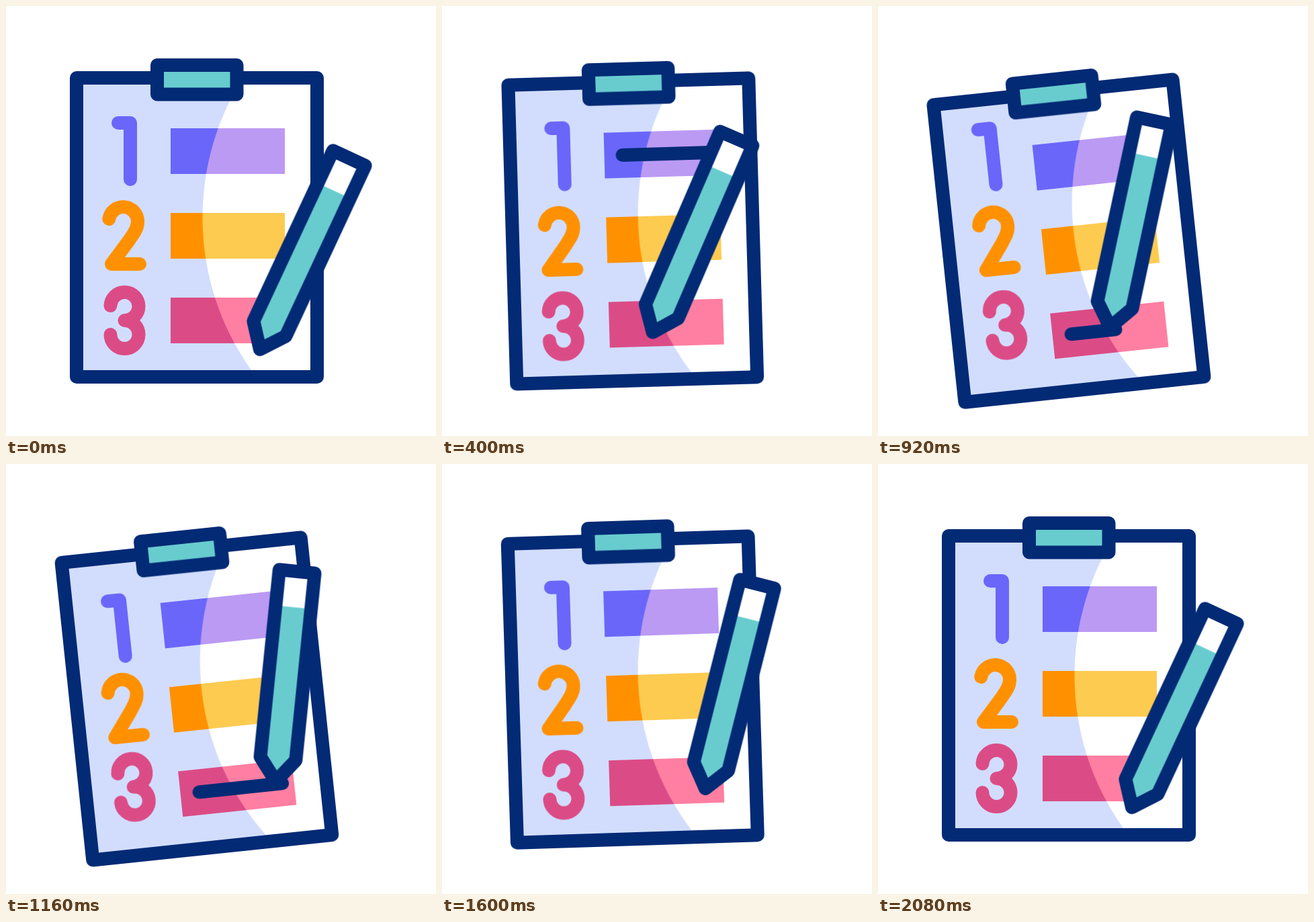
An HTML page that plays this animation: 640x640 px, repeating every 2600 ms.

```html
<!DOCTYPE html>
<html lang="en">
<head>
<meta charset="utf-8">
<title>Numbered list</title>
<style>
  html, body { margin: 0; width: 100%; height: 100%; overflow: hidden; background: #fff; }
  svg { display: block; width: 100vw; height: 100vh; }

  .outline { stroke: #032a75; stroke-width: 20; stroke-linejoin: round; stroke-linecap: round; }
  .digit { fill: none; stroke-width: 20; stroke-linejoin: round; stroke-linecap: round; }
  .line { fill: none; stroke-dasharray: 128 400; stroke-dashoffset: 142; }

  .board, .pencil, .digit, .line {
    animation: 2600ms cubic-bezier(.37, 0, .63, 1) infinite;
  }
  .board { transform-origin: 474px 340px; animation-name: tilt; }
  .pencil { animation-name: write; }
  .digit { animation-name: hop; }
  .two { animation-delay: 80ms; }
  .three { animation-delay: 160ms; }
  .line { animation-name: scribble; }
  .second { animation-delay: 305ms; }
  .third { animation-name: draw; }

  @keyframes tilt {
    0%, 4.615% { transform: rotate(0deg); }
    35.385%, 43.077% { transform: rotate(-6.05deg); }
    72.5%, 100% { transform: rotate(0deg); }
  }
  /* The pencil's origin is its tip. */
  @keyframes write {
    0%, 4.615% { transform: translate(378px, 511px) rotate(25deg); }
    23.077% { transform: translate(270px, 463.5px) rotate(25deg); }
    47.692%, 53.846% { transform: translate(392.5px, 464px) rotate(11.3deg); }
    73.077%, 100% { transform: translate(378px, 511px) rotate(25deg); }
  }
  @keyframes hop {
    0%, 13.846% { transform: translateY(0); }
    27.692%, 33.846% { transform: translateY(-24px); }
    47.692%, 100% { transform: translateY(0); }
  }
  @keyframes scribble {
    0%, 6.5% { stroke-dashoffset: 142; }
    6.9% { stroke-dashoffset: 128; }
    16.154% { stroke-dashoffset: 0; }
    22.3%, 100% { stroke-dashoffset: 142; }
  }
  @keyframes draw {
    0%, 22.5% { stroke-dashoffset: 142; }
    23% { stroke-dashoffset: 128; }
    47.3% { stroke-dashoffset: 0; }
    53.846%, 100% { stroke-dashoffset: 142; }
  }
</style>
</head>
<body>
<svg viewBox="0 0 640 640">
  <defs>
    <path id="shade" d="M105 107H352.3A391.5 391.5 0 0 0 372.4 552H105Z"/>
    <clipPath id="shaded"><use href="#shade"/></clipPath>
  </defs>

  <g class="board">
    <rect x="105" y="107" width="358" height="445" fill="#fff"/>
    <use href="#shade" fill="#d2ddfd"/>

    <path d="M245 182h170v68h-170z" fill="#bb9af3"/>
    <path d="M245 308h170v68h-170z" fill="#fdcb50"/>
    <path d="M245 434h170v68h-170z" fill="#fe7fa1"/>
    <g clip-path="url(#shaded)">
      <path d="M245 182h170v68h-170z" fill="#6a66fa"/>
      <path d="M245 308h170v68h-170z" fill="#ff9100"/>
      <path d="M245 434h170v68h-170z" fill="#db4c86"/>
    </g>

    <rect class="outline" x="105" y="107" width="358" height="445" fill="none"/>
    <rect class="outline" x="225" y="88" width="118.500" height="43.500" fill="#68cccf"/>

    <path class="digit" stroke="#6a66fa" d="M167 174H185V258"/>
    <path class="digit two" stroke="#ff9100"
      d="M153.300 317A21.500 21.500 0 0 1 196 321C196 333 188 341 183 349L157 384H199"/>
    <path class="digit three" stroke="#db4c86"
      d="M155.500 446A21 21 0 1 1 176.500 468A21 21 0 1 1 155.500 489"/>

    <path class="outline line" d="M272 216h128"/>
    <path class="outline line second" d="M272 342h128"/>
    <path class="outline line third" d="M273 468h128"/>

    <g class="pencil">
      <path d="M-26.500-314h53V-34L0 0L-26.500-34Z" fill="#68cccf"/>
      <path d="M-26.500-314h53v53.500h-53z" fill="#fff"/>
      <path class="outline" d="M-26.500-314h53V-34L0 0L-26.500-34Z" fill="none"/>
    </g>
  </g>
</svg>
</body>
</html>
```
